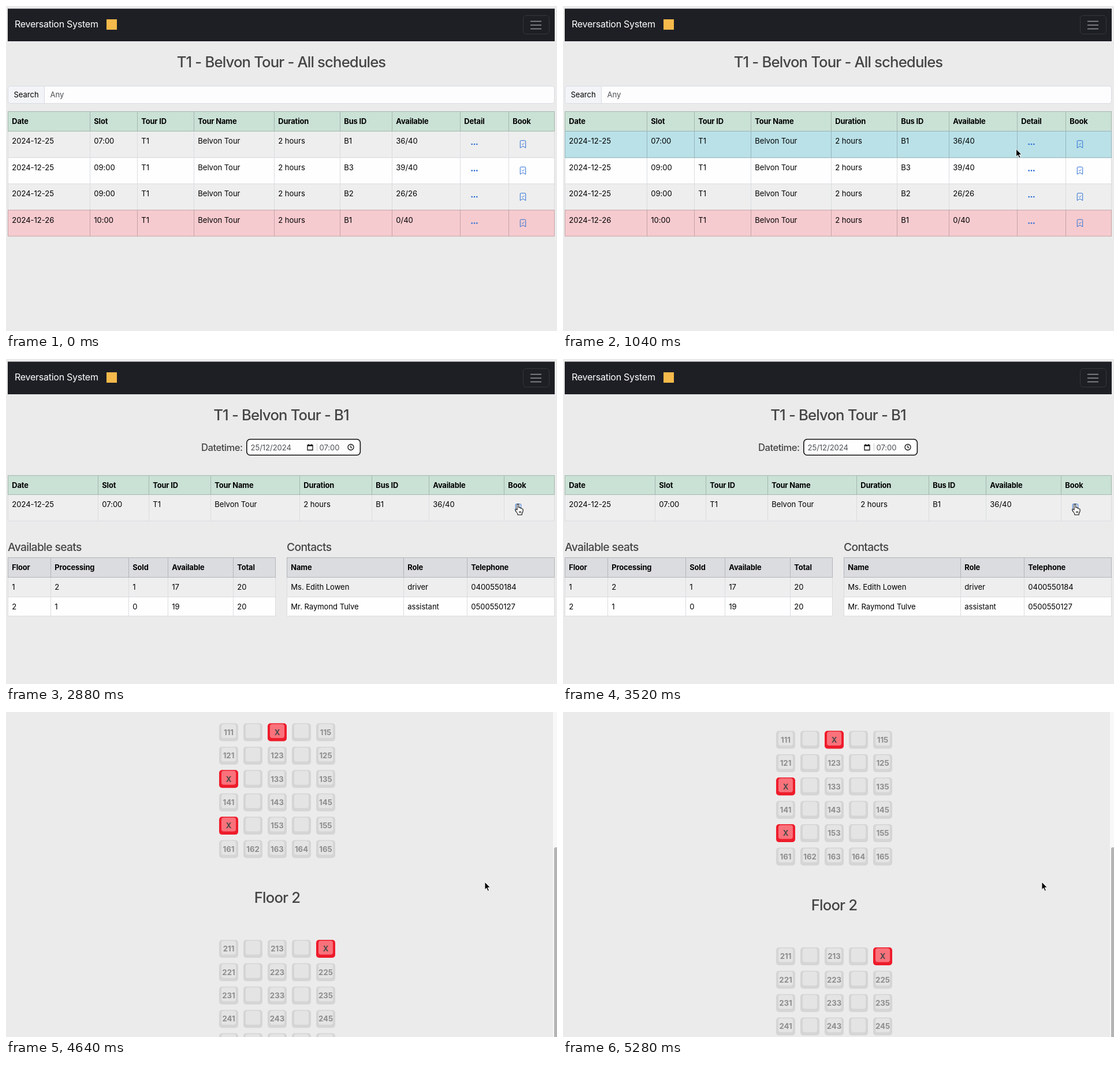
Recreate the animation shown at these times as an HTML page. Size 954 by 562 pixels, loop 5360 ms.

```html
<!DOCTYPE html>
<html lang="en">
<head>
<meta charset="utf-8">
<title>Tour booking</title>
<style>
  html, body { margin: 0; width: 100%; height: 100%; overflow: hidden; background: #ebebeb; }
  svg { display: block; }
  text { font: 13.1px Inter, "Open Sans", sans-serif; letter-spacing: -.004em; fill: #000; stroke: none; }
  .head { font-size: 12.9px; font-weight: 700; letter-spacing: -.012em; }
  .title { font-size: 25.7px; font-weight: 500; letter-spacing: -.033em; fill: #454545; text-anchor: middle; }
  .sub { font-size: 19.3px; font-weight: 500; letter-spacing: -.035em; fill: #454545; }
  .label { font-size: 16.6px; font-weight: 500; letter-spacing: -.03em; fill: #454545; }
  .brand { font-size: 16.1px; letter-spacing: -.019em; fill: #fff; }
  .grey { fill: #4c4f53; }
  .dark { fill: #333; }
  .legend { font-size: 11.4px; fill: #666; }
  .mid { text-anchor: middle; }
  .seat { font-size: 13.2px; font-weight: 700; letter-spacing: 0; fill: #8d8d8d; text-anchor: middle; }
  .taken { fill: #4a4a4a; }
</style>
</head>
<body>
<svg id="stage" width="954" height="562" viewBox="0 0 954 562"></svg>
<script>
const LOOP = 5360, STEP = 80;
const TOUR = 'Belvon Tour';
const RED = '#ee1c2b', BLUE = '#2a6fd6';
const ROW_TOPS = [216.5, 262.2, 307.5, 353, 398];

const text = (x, y, s, cls = '') => `<text x="${x}" y="${y}" class="${cls}">${s}</text>`;
const rect = (x, y, w, h, fill, extra = '') =>
  `<rect x="${x}" y="${y}" width="${w}" height="${h}" fill="${fill}" ${extra}/>`;
const path = (d, stroke, extra = '') => `<path d="${d}" fill="none" stroke="${stroke}" ${extra}/>`;

const SKIN = {
  odd: ['#eeeeee', '#dadcdf'],
  even: ['#fefefe', '#dadcdf'],
  success: ['#cae1d6', '#a3b7ad'],
  danger: ['#f6cbcf', '#c3a4a7'],
  secondary: ['#dbdce0', '#b2b4b8'],
  hoverOdd: ['#bae1e8', '#96b5bb'],
  hoverEven: ['#c6f0f8', '#9fbec5'],
  hoverDanger: ['#e6bec2', '#b89a9d']
};

const icons = {
  dots: (x, y) => [-4.3, 0, 4.3].map(d => `<circle cx="${x + d}" cy="${y}" r="1.35" fill="${BLUE}" stroke="none"/>`).join(''),
  mark: (x, y) => path(`M${x - 4.7} ${y + 6.3}v-11.3q0-1.3 1.3-1.3h6.8q1.3 0 1.3 1.3v11.3l-4.7-2.9zm2.6-7 1.6 1.6 2.9-2.9`, BLUE)
};

// A row is one group so that its cells share fill and border.
function row(cols, top, bottom, cells, skin, cls = '', id = '') {
  const [fill, stroke] = SKIN[skin];
  const body = cells.map((cell, i) => {
    const x = cols[i];
    const box = `<rect x="${x}" y="${top}" width="${cols[i + 1] - x}" height="${bottom - top}"/>`;
    return box + (icons[cell] ? icons[cell](x + 24.5, top + 22.5) : text(x + 6.8, top + 21.7, cell, cls));
  }).join('');
  return `<g id="${id}" fill="${fill}" stroke="${stroke}">${body}</g>`;
}

function navbar(right) {
  const x = right - 55;
  return rect(3, 4.6, right - 3, 56.4, '#1e1f25') + text(15, 37, 'Reversation System', 'brand') +
    rect(174, 23, 18, 18, '#f6b94b') +
    rect(x + .5, 16.5, 45, 32, 'none', 'rx="5" stroke="#35373c"') +
    path(`M${x + 13} 26.5h19m-19 6.5h19m-19 6.5h19`, '#96979a', 'stroke-width="1.4"');
}

function field(x, split, right, y, label, inner = '') {
  const h = 30;
  return rect(x, y, right - x, h, '#fdfdfd', 'rx="4"') +
    `<path d="M${split} ${y}H${x + 4}q-4 0-4 4v${h - 8}q0 4 4 4H${split}z" fill="#f3f4f8"/>` +
    rect(x, y, right - x, h, 'none', 'rx="4" stroke="#d8dbe1"') +
    path(`M${split} ${y}v${h}`, '#d8dbe1') +
    text(x + 10, y + 19.7, label) + text(split + 10, y + 19.7, inner, 'grey');
}

function schedulePage() {
  const cols = [3.5, 145.5, 227.5, 325.5, 464.5, 578.5, 668.5, 786.5, 870.5, 949.5];
  const data = [['25', '07', 'B1', '36/40'], ['25', '09', 'B3', '39/40'], ['25', '09', 'B2', '26/26'], ['26', '10', 'B1', '0/40']];
  const rows = data.map(([day, hour, bus, free], i) =>
    row(cols, ROW_TOPS[i], ROW_TOPS[i + 1],
      ['2024-12-' + day, hour + ':00', 'T1', TOUR, '2 hours', bus, free, 'dots', 'mark'], rowSkin(i, false), '', 'row' + i));
  return navbar(950) + text(476.5, 106, `T1 - ${TOUR} - All schedules`, 'title') +
    field(3.5, 66.5, 949.5, 138.5, 'Search', 'Any') +
    `<g id="rows">${rows.join('')}` +
    row(cols, 182.5, 216.5, ['Date', 'Slot', 'Tour ID', 'Tour Name', 'Duration', 'Bus ID', 'Available', 'Detail', 'Book'], 'success', 'head') + '</g>';
}

function detailPage() {
  const cols = [3.5, 159.5, 247.5, 354.5, 508.5, 633.5, 732.5, 862.5, 949.5];
  const seats = [3.5, 77.5, 212.5, 280.5, 393.5, 466.5], people = [486.5, 688.5, 798.5, 949.5];
  const small = (c, head, a, b) => row(c, 377.5, 411.5, a, 'odd') + row(c, 411.5, 444.5, b, 'even') +
    row(c, 343.5, 377.5, head, 'secondary', 'head');
  return navbar(950) + text(476.5, 106, `T1 - ${TOUR} - B1`, 'title') +
    text(338, 158.5, 'Datetime:', 'label') +
    rect(416.8, 138.8, 196.6, 27.4, '#fefefe', 'rx="6" stroke="#111" stroke-width="1.6"') +
    text(423.5, 157.5, '25/12/2024', 'grey') + text(542.5, 157.5, '07:00', 'grey') +
    path('M538.5 146v13', '#ccc') +
    path('M522 149h9v8.5h-9zm0 1h9M524 147v2m5-2v2', '#111', 'stroke-width="1.3"') +
    path('M602 152.5a5 5 0 1 1-10 0a5 5 0 1 1 10 0M597 149.5v3.3l2.2 1.2', '#111', 'stroke-width="1.3"') +
    row(cols, 234.5, 280, ['2024-12-25', '07:00', 'T1', TOUR, '2 hours', 'B1', '36/40', 'mark'], 'odd') +
    row(cols, 201.5, 234.5, ['Date', 'Slot', 'Tour ID', 'Tour Name', 'Duration', 'Bus ID', 'Available', 'Book'], 'success', 'head') +
    text(3, 332, 'Available seats', 'sub') + text(486, 332, 'Contacts', 'sub') +
    small(seats, ['Floor', 'Processing', 'Sold', 'Available', 'Total'], ['1', '2', '1', '17', '20'], ['2', '1', '0', '19', '20']) +
    small(people, ['Name', 'Role', 'Telephone'], ['Ms. Edith Lowen', 'driver', '0400550184'], ['Mr. Raymond Tulve', 'assistant', '0500550127']);
}

function seat(x, y, id, empty) {
  const taken = [113, 131, 151, 215].includes(id);
  return rect(x, y, 33, 31, taken ? RED : '#d5d5d5', 'rx="5"') +
    rect(x + 4, y + 1.5, 25, 24, taken ? '#f9727b' : '#e4e4e4', 'rx="4"') +
    (empty ? '' : text(x + 16.5, y + 20.2, taken ? 'X' : id, 'seat' + (taken ? ' taken' : '')));
}

function floor(n, top) {
  let out = text(469.5, top - 64, 'Floor ' + n, 'title');
  for (let r = 1; r <= 6; r++)
    for (let c = 1; c <= 5; c++)
      out += seat(327 + 42 * c, top + 40.4 * (r - 1), n * 100 + r * 10 + c, c % 2 == 0 && r < 6);
  return out;
}

function layoutPage() {
  const legend = [[278, 'Occupied', RED], [435.5, 'Selected', '#4a8df6'], [588.5, 'VIP', '#f8a04f'], [712, 'Unselected', '#d5d5d5']];
  return '<g id="scroll">' + navbar(936) + text(469.5, 106, `Bus Layout - B1 - ${TOUR}`, 'title') +
    text(469.5, 133, 'Pick the seats - Confirm by pressing Book', 'mid dark') +
    field(218.5, 255.5, 376.5, 171.5, 'Tel') + field(390.5, 443.5, 635.5, 171.5, 'Email') +
    rect(649.5, 171.5, 51, 30, '#fdd985', 'rx="4" stroke="#e3b04c"') + text(675, 191.2, 'Book', 'mid') +
    text(165.5, 258, 'N/A', 'legend') +
    legend.map(([x, name, fill]) => rect(x, 249, 9.5, 9.5, fill) + text(x + 12.5, 258, name, 'legend')).join('') +
    floor(1, 388) + floor(2, 762.5) + '</g>' +
    rect(947, 0, 7, 562, '#f8f8f8') + rect(949, 0, 8, 462, '#b4b4b4', 'rx="3" id="thumb"');
}

const rowSkin = (i, hover) =>
  i == 3 ? (hover ? 'hoverDanger' : 'danger') : i % 2 ? (hover ? 'hoverEven' : 'even') : (hover ? 'hoverOdd' : 'odd');

// Keys are [time, value, value...], linear in between.
const CURSOR = [[240, 690, 469], [480, 705, 410], [720, 718, 306.5], [960, 772, 252], [1200, 810, 238],
  [2320, 811, 239], [2800, 887, 251], [3600, 887, 251], [3920, 851, 285], [4320, 851, 285], [4560, 829, 294]];
const SCROLL = [[4320, 0], [4400, 60], [4480, 190], [4560, 330], [4640, 368.5], [4800, 364], [5040, 358], [5280, 355.5]];
const MAX_SCROLL = 355.5;

function at(keys, t) {
  const i = keys.findIndex(k => k[0] > t);
  if (i < 0) return keys[keys.length - 1].slice(1);
  if (i == 0) return keys[0].slice(1);
  const a = keys[i - 1], b = keys[i], u = (t - a[0]) / (b[0] - a[0]);
  return a.slice(1).map((v, n) => v + (b[n + 1] - v) * u);
}

const stage = document.getElementById('stage');
stage.innerHTML = rect(0, 0, 954, 562, '#ebebeb') +
  [schedulePage(), detailPage(), layoutPage()].map((p, i) => `<g id="page${i}">${p}</g>`).join('') +
  `<g id="cursor">
    <path id="arrow" d="M0 0V13.2l3-2.7 2.2 5 2.2-1-2.2-4.8h4.2z" fill="#000" stroke="#fff" stroke-width=".9"/>
    <path id="hand" d="M-2 10V1.3q0-1.6 1.4-1.6t1.4 1.6V6q2.6-.8 2.8 1 2.2-.6 2.6 1 2-.2 2 1.8 0 4.5-2 6.4v2.3h-7.2v-2q-3.2-3.5-4.2-6.2-.5-1.8 1.2-1.8 1 .2 2 1.5zM2 12v3.5m2.2-3.5v3.5" fill="#fff" stroke="#111" stroke-width="1.1" stroke-linejoin="round"/>
  </g>`;

const $ = id => document.getElementById(id);
const show = (id, on) => $(id).setAttribute('display', on ? 'inline' : 'none');

let hovered = -1;
function hover(i) {
  if (i == hovered) return;
  hovered = i;
  for (let n = 0; n < 4; n++) {
    const [fill, stroke] = SKIN[rowSkin(n, n == i)];
    $('row' + n).setAttribute('fill', fill);
    $('row' + n).setAttribute('stroke', stroke);
  }
  // Tinted rows go on top so their borders win.
  $('rows').append($('row3'));
  if (i >= 0) $('rows').append($('row' + i));
}

function draw(now) {
  const t = Math.floor(now % LOOP / STEP) * STEP;
  const page = t < 2080 ? 0 : t < 3600 ? 1 : 2;
  for (let i = 0; i < 3; i++) show('page' + i, i == page);

  const [x, y] = at(CURSOR, t);
  hover(ROW_TOPS.slice(0, 4).findIndex((top, i) => y >= top && y < ROW_TOPS[i + 1]));
  const hand = page == 0 && x > 804 || page == 1 && x > 881;
  show('cursor', t >= 240 && (t < 1760 || t >= 2320));
  show('hand', hand);
  show('arrow', !hand);
  $('cursor').setAttribute('transform', `translate(${x} ${y})`);

  const [s] = at(SCROLL, t);
  $('scroll').setAttribute('transform', `translate(0 ${-s})`);
  $('thumb').setAttribute('y', Math.min(s / MAX_SCROLL, 1) * 234);
  requestAnimationFrame(frame);
}

const start = performance.now();
function frame() { draw(performance.now() - start); }
frame();
</script>
</body>
</html>
```
